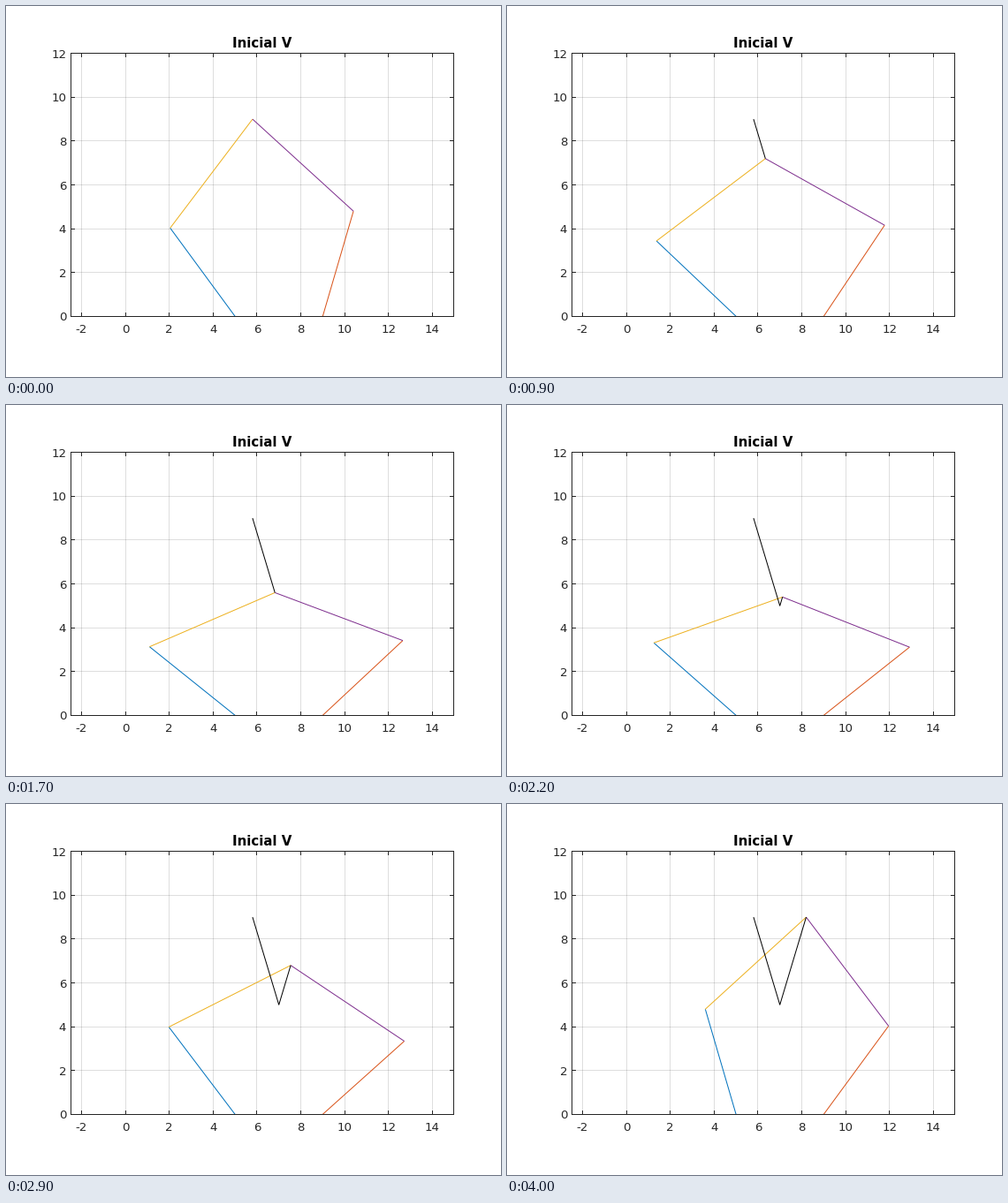
These frames come from a looping animation (560x420 px, 4.1 s). A matplotlib script:

```python
import math

import numpy as np
import matplotlib.pyplot as plt
from matplotlib.animation import FuncAnimation

W, H, DPI = 560, 420, 80
PX = 72 / DPI                      # one pixel in points
SCALE = 24.8                       # pixels per data unit
X0, Y0 = 135.1, 351.3              # pixel place of the data origin
LEFT, RIGHT, TOP, BOTTOM = 73, 506, 53, 351
INK = "#262626"

LOWER, UPPER = 5.0, 6.23           # link lengths
BASES = np.array([[5.0, 0.0], [9.0, 0.0]])
STEPS = 41

plt.rcParams["font.family"] = "DejaVu Sans"
fig = plt.figure(figsize=(W / DPI, H / DPI), dpi=DPI, facecolor="white")
ax = fig.add_axes([0, 0, 1, 1])
ax.set_xlim(0, W)
ax.set_ylim(H, 0)
ax.axis("off")


def line(xs, ys, color, z, alpha=1):
    """A line one pixel wide, in pixel coordinates."""
    (artist,) = ax.plot(xs, ys, color=color, lw=PX, zorder=z, alpha=alpha,
                        solid_capstyle="butt", solid_joinstyle="round")
    artist.set_snap(False)
    return artist


def hline(row, a, b, z, alpha=1):
    line([a, b + 1], [row + 0.5] * 2, INK, z, alpha)


def vline(col, a, b, z, alpha=1):
    line([col + 0.5] * 2, [a, b + 1], INK, z, alpha)


def label(x, y, text, size, **kw):
    ax.text(x, y, text, fontsize=size * PX, va="baseline", **kw)


def draw_axes():
    tick, faint = 4, 0.15
    for v in range(-2, 15, 2):
        x = X0 + SCALE * v
        col = math.floor(x)
        vline(col, TOP, BOTTOM, 1, faint)
        vline(col, TOP, TOP + tick, 5)
        vline(col, BOTTOM - tick, BOTTOM, 5)
        label(x, 370, str(v), 13.33, ha="center", color=INK)
    for v in range(0, 13, 2):
        y = Y0 - SCALE * v
        row = math.floor(y)
        hline(row, LEFT, RIGHT, 1, faint)
        hline(row, LEFT, LEFT + tick, 5)
        hline(row, RIGHT - tick, RIGHT, 5)
        label(68.2, y + 5.1, str(v), 13.33, ha="right", color=INK)
    for row in (TOP, BOTTOM):
        hline(row, LEFT, RIGHT, 5)
    for col in (LEFT, RIGHT):
        vline(col, TOP, BOTTOM, 5)
    label(290, 47, "Inicial V", 15, ha="center", color="black",
          weight="bold")


def pen(k):
    """Pen position: down to the foot of the V, then up again."""
    return np.array([5.8 + 0.06 * k, 5 + 0.2 * abs(k - 20)])


def elbow(base, tip, side):
    """Joint between the two links; side is -1 for left, 1 for right."""
    d = np.hypot(*(tip - base))
    u = (tip - base) / d
    along = (LOWER**2 - UPPER**2 + d**2) / (2 * d)
    off = np.sqrt(LOWER**2 - along**2)
    return base + along * u + side * off * np.array([u[1], -u[0]])


def place(artist, points):
    x, y = np.array(points).T
    artist.set_data(X0 + SCALE * x, Y0 - SCALE * y)


draw_axes()
lower = [line([], [], c, 3) for c in ("#0072bd", "#d95319")]
upper = [line([], [], c, 3) for c in ("#edb120", "#7e2f8e")]
trace = line([], [], "black", 4)


def update(k):
    tip = pen(k)
    for i, side in enumerate((-1, 1)):
        joint = elbow(BASES[i], tip, side)
        place(lower[i], [BASES[i], joint])
        place(upper[i], [joint, tip])
    place(trace, [pen(j) for j in range(k + 1)])
    trace.set_visible(k > 0)
    return [*lower, *upper, trace]


anim = FuncAnimation(fig, update, frames=STEPS, interval=100, repeat=True,
                     repeat_delay=0, blit=False)
plt.show()
```
